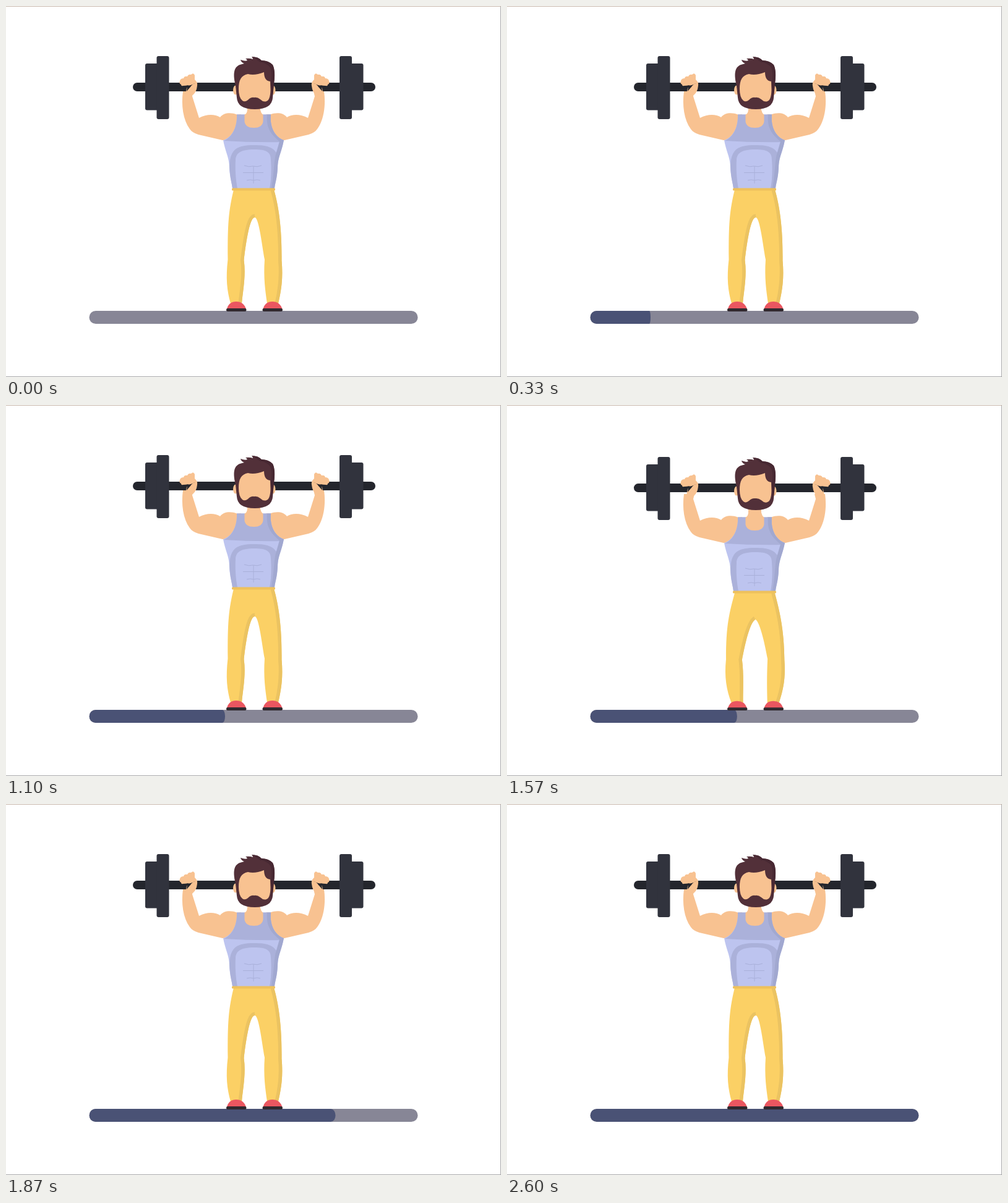
Write an HTML page that moves like this. It is 800 px wide and 600 px high and loops after 3.03 s.

```html
<!DOCTYPE html>
<html lang="en">
<head>
<meta charset="utf-8">
<title>Squats</title>
<style>
html, body { margin: 0; width: 100%; height: 100%; overflow: hidden; background: #fff; }
svg { display: block; width: 800px; height: 600px; }
</style>
</head>
<body>
<svg viewBox="0 0 800 600" xmlns="http://www.w3.org/2000/svg">
  <defs>
    <clipPath id="trackClip"><rect x="134.5" y="493" width="531" height="21" rx="10.5"/></clipPath>
    <clipPath id="pantsClip"><path id="pantsEdge"/></clipPath>
    <clipPath id="hairClip"><use href="#hair"/></clipPath>
    <g id="plates">
      <rect x="225" y="93" width="22" height="75.500" rx="3"/>
      <rect x="243.500" y="81" width="20" height="102" rx="3"/>
    </g>
    <path id="arm" d="M286 138 C283 160 286 184 297 199 Q301 205 311 208 L350 217 L380 215 L380 175 L373 175.500 C364 172 352 172 346 180 C338 175 325 174 312 181 L301 146 L303 138 Z"/>
    <g id="hand">
      <path d="M290 143 L292 133 L295 128 Q290 129 286 129 Q283 130 283 127 Q279 125 281 121 Q282 117 287 117 Q288 113 293 114 Q295 110 299 111 Q303 107 305 112 L305 119 Q310 123 309 129 Q308 139 302 144 Z"/>
      <path d="M293 129 Q300 128 306 125 Q301 126 298 131 Q295 134 292 138 Z" fill="#24262d"/>
    </g>
    <g id="shoe">
      <path d="M357 490 Q360 478 372 478 Q384 478 388 490 Z" fill="#ea5660"/>
      <rect x="356" y="489" width="32.500" height="5" rx="2.300" fill="#30292f"/>
    </g>
  </defs>

  <path d="M0 .5H800" stroke="#c8b9ad"/>
  <path d="M799.500 1V599.500M0 599.500H800" stroke="#a9a9ab" fill="none"/>

  <g clip-path="url(#trackClip)">
    <rect x="134" y="493" width="532" height="21" fill="#878696"/>
    <rect id="fill" x="134.500" y="493" height="21" ry="10.500" fill="#4a5275"/>
  </g>

  <g class="upper">
    <rect x="205" y="124" width="392" height="14" rx="7" fill="#24262d"/>
    <g fill="#31333d">
      <use href="#plates"/>
      <use href="#plates" transform="matrix(-1 0 0 1 802.500 0)"/>
    </g>
  </g>

  <path id="pants" fill="#fbd065"/>
  <g clip-path="url(#pantsClip)" fill="none" stroke="#ebc361" stroke-width="11">
    <path id="shadeL"/>
    <path id="shadeR"/>
  </g>

  <g class="torso">
    <g fill="#f8c291">
      <use href="#arm"/>
      <use href="#arm" transform="matrix(-1 0 0 1 800 0)"/>
    </g>
    <path d="M373 175.500 H428 C426 195 434 212 449 217 C445 238 439 245 439 262 C438 280 435 285 434 295 H366 C365 285 362 280 361 262 C361 245 355 238 351 217 C366 212 374 195 373 175.500 Z" fill="#bdc4ef"/>
    <path d="M373 175.500 H428 C426 195 434 212 449 217 L447 220 Q400 221 352 218 C366 212 374 195 373 175.500 Z" fill="#abb1da"/>
    <path d="M366 295 C365 285 362 280 361 258 C363 232 372 225 401 225 C422 225 430 228 437 237 L432 295 H426 C429 280 429 262 428 249 C428 236 421 232 401 232 C379 232 371 238 371 250 C370 268 372 284 374 295 Z" fill="#abb1da"/>
    <path d="M422 175.500 H428 C426 195 434 212 449 217 C445 238 439 245 439 262 C438 280 435 285 434 295 H429 C433 275 433 250 436 240 L442 219 C427 207 420 196 422 175.500 Z" fill="#a1a8d0"/>
    <path d="M385 258 Q393 261 399 259 Q406 261 413 258 M383 269.500 H416 M389 282 Q395 280 400 282 Q406 280 411 282 M400 259 V287" fill="none" stroke="#a9b0da"/>
    <path d="M390 158 H411 V168 Q412 173 415.500 176 V187 Q414 197 400.500 197 Q387 197 385.500 187 V176 Q390 173 390 168 Z" fill="#f8c291"/>
    <rect x="365" y="294.500" width="70" height="4" rx="1.500" fill="#eec15c"/>
  </g>

  <g class="upper">
    <g fill="#f8c291">
      <ellipse cx="371" cy="136" rx="4" ry="7.500"/>
      <ellipse cx="431.500" cy="136" rx="4" ry="7.500"/>
    </g>
    <path id="hair" d="M371 129 C367 112 367 99 378 95 L385 93 Q380 91 379 87 Q387 90 390 88 Q389 86 387 85 Q394 84 399 86 Q399 84 397 82 Q408 82 413 88 Q424 88 431 95 Q436 104 433 127 L431 148 Q430 167 402 167 Q374 167 373 148 Z" fill="#523039"/>
    <path d="M397 82 Q408 82 413 88 Q424 88 431 95 Q436 104 433 127 L430 154 L428 126 Q432 104 425 97 Q418 91 411 91 Q405 86 397 82 Z" fill="#472832" clip-path="url(#hairClip)"/>
    <path d="M376 134 C376 120 380 112 391 110 Q402 113 417 107 Q417 121 427 122 L427.500 136 Q427 152 421 154 Q416 156 411 151 Q406 147 401 148 Q396 147 391 152 Q386 156 382 153 Q376 148 376 134 Z" fill="#f8c291"/>
    <g fill="#f8c291">
      <use href="#hand"/>
      <use href="#hand" transform="matrix(-1 0 0 1 803 0)"/>
    </g>
  </g>

  <g id="shoes">
    <use href="#shoe"/>
    <use href="#shoe" x="58.500"/>
  </g>
</svg>
<script>
const LOOP = 3030, RATE = 0.03, STEPS = 10;
// first frame and filled widths of each squat
const reps = [
  { start: 0, from: 0, to: 97.5 },
  { start: 23, from: 97.5, to: 219.5 },
  { start: 46, from: 219.5, to: 398 },
  { start: 68, from: 398, to: 531 }
];
// each leg edge: standing, bent
const legs = {
  outerL: ['368 297 C360 330 358 350 358.5 410 C355 440 357 460 363 481',
           '369 321 C358 352 341 372 340.5 415 C339 440 348 465 362 484'],
  innerL: ['381 481 C383 460 388 436 384.500 411 C387 390 393 342 402 342',
           '383 484 C376 465 368 435 366 415 C374 398 388 382 400 361'],
  innerR: ['402 342 C409 342 414 390 418 410 C416 440 419 460 422 481',
           '400 361 C411 380 428 395 430.500 412 C431 440 424 465 417 484'],
  outerR: ['440 481 C445 460 448 440 445.500 412 C446 360 441 325 433 297',
           '438 484 C452 460 458 445 457 415 C454 375 439 355 431 321']
};
const el = id => document.getElementById(id);
const clamp = (v, lo, hi) => Math.min(hi, Math.max(lo, v));
const smooth = u => u * u * (3 - 2 * u);

function blend([a, b], u) {
  const ends = b.match(/[\d.]+/g);
  let i = 0;
  return a.replace(/[\d.]+/g, n => (+n + (ends[i++] - n) * u).toFixed(2));
}

function shift(name, y) {
  document.querySelectorAll('.' + name).forEach(g => g.setAttribute('transform', `translate(0 ${y})`));
}

function draw(time) {
  const frame = Math.floor((time % LOOP + 4) * RATE);
  const rep = reps.filter(r => frame >= r.start).pop();
  const k = clamp(frame - rep.start, 0, STEPS);
  const depth = 1 - Math.abs(k - 5) / 5;
  const width = rep.from + (rep.to - rep.from) * k / STEPS;

  el('fill').setAttribute('width', width);
  el('fill').setAttribute('rx', 10.5 * width / 531);
  shift('torso', 30 * depth);
  shift('upper', 30 * smooth(depth));

  const edge = {};
  for (const name in legs) edge[name] = blend(legs[name], depth / 0.8);
  const outline = `M${edge.outerL} L${edge.innerL} L${edge.innerR} L${edge.outerR} Z`;
  el('pants').setAttribute('d', outline);
  el('pantsEdge').setAttribute('d', outline);
  el('shadeL').setAttribute('d', 'M' + edge.innerL);
  el('shadeR').setAttribute('d', 'M' + edge.outerR);

  const squash = 1 - 0.22 * depth;
  el('shoes').setAttribute('transform', `matrix(1 0 0 ${squash} 0 ${494 * (1 - squash)})`);
}

const begin = performance.now();
function tick() {
  draw(performance.now() - begin);
  requestAnimationFrame(tick);
}
tick();
</script>
</body>
</html>
```
